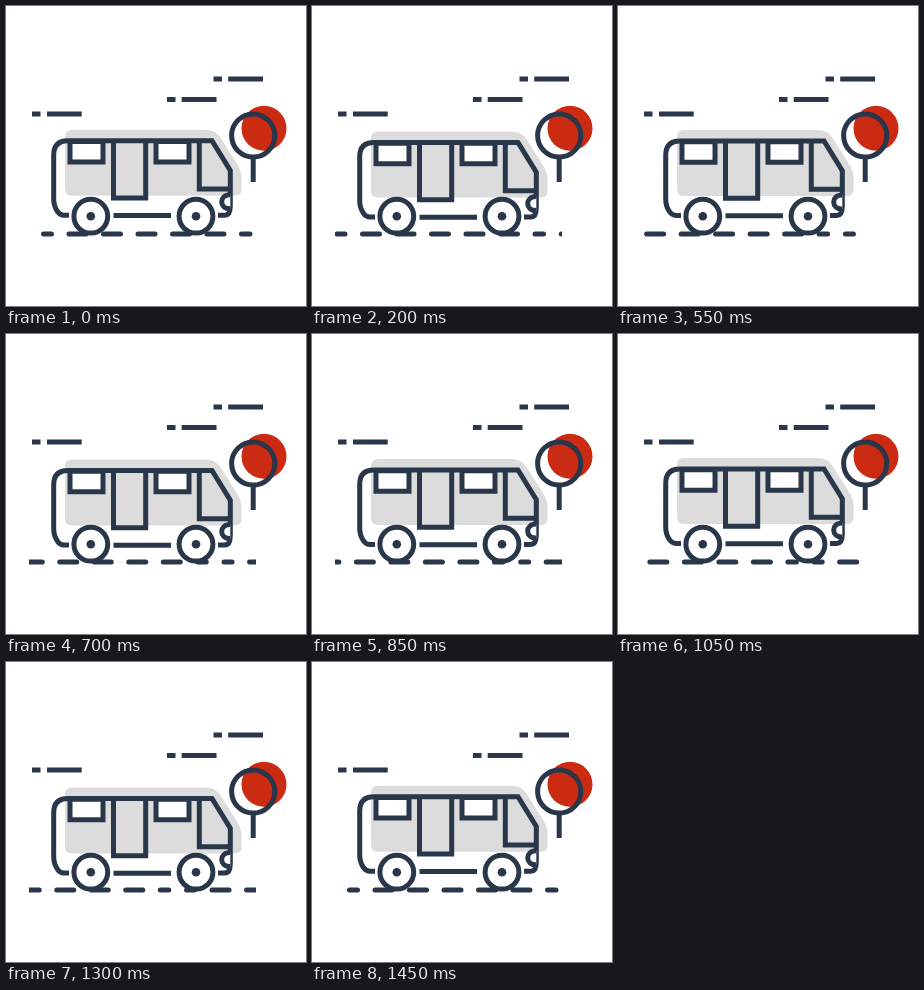
These frames come from a looping animation (300x300 px, 1500 ms). An HTML page:

```html
<!DOCTYPE html>
<html lang="en">
<head>
<meta charset="utf-8">
<title>Bus ride</title>
<style>
  html, body { margin: 0; width: 100%; height: 100%; overflow: hidden; background: #fff; }
  svg { display: block; width: 100vw; height: 100vh; }
  .line { fill: none; stroke: #2a364a; stroke-width: 5; }
  .white { fill: #fff; }
  .round { stroke-linecap: round; }
</style>
</head>
<body>
<svg viewBox="0 0 300 300">
  <defs>
    <clipPath id="view"><rect x="23" y="220" width="227" height="16"/></clipPath>
  </defs>

  <path class="line" d="M26 108H34.500M41 108H75.700M161 93.500H169.500M175.700 93.500H210.500M207.500 73H216M222.200 73H257"/>

  <circle cx="258" cy="122.300" r="22.500" fill="#cb2a13"/>
  <circle class="line" cx="247.200" cy="129.500" r="21.600"/>
  <path class="line" d="M247.200 151V176"/>

  <g id="bus">
    <path fill="#dcdcdc" d="M66 123.800H199Q209 123.800 214 131L230.500 157Q235.500 164 235.500 172V183Q235.500 189.800 229 189.800H66Q59 189.800 59 183V131Q59 123.800 66 123.800Z"/>
    <path class="line" d="M63 209.200H58Q54 209.200 51.500 205.500Q47.700 200 47.700 193V149Q47.700 134.700 62 134.700H206L224.300 164.500V200Q224.300 209.200 219 209.200H212M107.500 209.500H165"/>
    <path class="line white" d="M64 135.500H97V156H64ZM150 135.500H183V156H150Z"/>
    <path class="line" d="M107.500 135V192H139.700V135M193.300 135V183H224.300"/>
    <path class="line white" d="M224.300 188.800C212.800 188.800 212.800 202.800 224.300 202.800"/>
  </g>

  <g clip-path="url(#view)"><path id="road" class="line round"/></g>

  <g id="wheels"></g>
</svg>
<script>
  const LOOP = 1500, STEP = 50, RESET = 1450;
  const SPEED = 0.0625, BOB = 2, BOB_TIME = 500;
  const UNIT = 224.3, GAP = 12.5;
  const lengths = [13, 22, 22, 22, 22, 22, 13.5];
  const el = id => document.getElementById(id);

  // One road unit ends with a short dash; the next starts with one.
  function roadPath() {
    let d = "";
    for (let unit = -1; unit < 2; unit++) {
      let x = 35 + unit * UNIT;
      for (const len of lengths) {
        d += `M${x + 2.5} 228H${x + len - 2.5}`;
        x += len + GAP;
      }
    }
    return d;
  }

  const wheel = x => `
    <circle class="line" cx="${x}" cy="210.200" r="16.900"/>
    <circle cx="${x}" cy="210.200" r="4.300" fill="#2a364a"/>`;

  el("road").setAttribute("d", roadPath());
  el("wheels").innerHTML = wheel(84.8) + wheel(190);

  function draw(time) {
    let t = Math.floor((time % LOOP) / STEP) * STEP;
    if (t >= RESET) t = 0;
    const drop = BOB * (1 - Math.cos(2 * Math.PI * t / BOB_TIME)) / 2;
    el("bus").setAttribute("transform", `translate(0 ${drop.toFixed(3)})`);
    el("road").setAttribute("transform", `translate(${-SPEED * t} 0)`);
  }

  const start = performance.now();
  function tick() {
    draw(performance.now() - start);
    requestAnimationFrame(tick);
  }
  tick();
</script>
</body>
</html>
```
